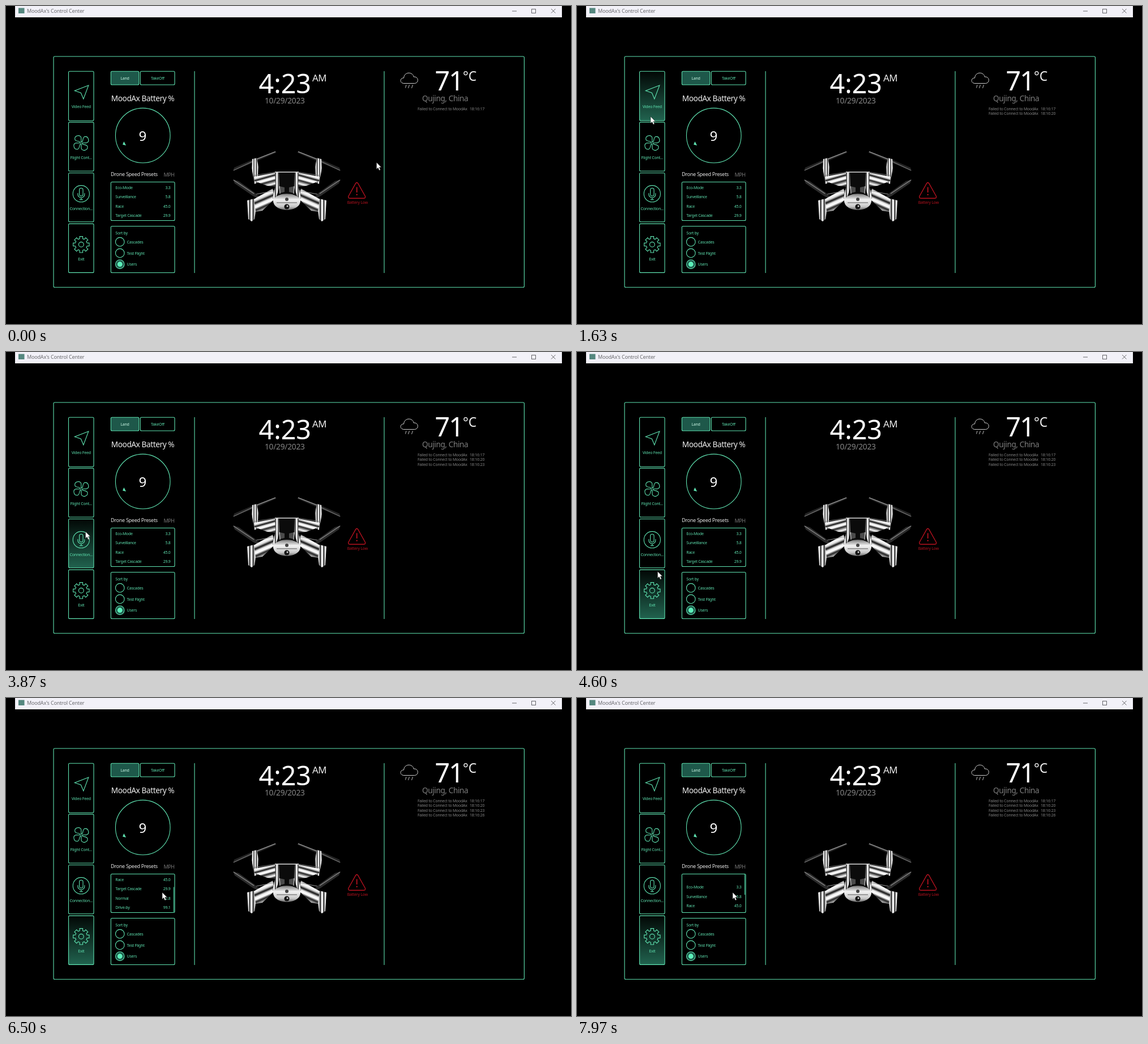
These frames come from a looping animation (998x561 px, 8 s). An HTML page with a canvas:

```html
<!DOCTYPE html>
<html lang="en">
<head>
<meta charset="utf-8">
<title>Control Center</title>
<style>
  html, body { margin: 0; width: 100%; height: 100%; overflow: hidden; background: #000; }
  canvas { display: block; width: 998px; height: 561px; }
</style>
</head>
<body>
<canvas id="stage" width="998" height="561"></canvas>
<script>
const ctx = document.getElementById('stage').getContext('2d');
const LOOP = 8000;
const MINT = '#5fe3b1', GREY = '#858585', RED = '#b5121f';
const BRAND = 'MoodAx';
const CARD_X = 110.5, CARD_W = 44.5, CARD_H = 87, CARD_Y = 115.3, CARD_STEP = 89.6;
const CARDS = ['Video Feed', 'Flight Cont...', 'Connection...', 'Exit'];
const PRESETS = [['Eco-Mode', '3.3'], ['Surveillance', '5.8'], ['Race', '45.0'],
  ['Target Cascade', '29.9'], ['Normal', '12.8'], ['Drive-by', '99.1']];
const ROW = 16.6;
// Log entries: time of appearance, printed clock
const LOG = [[0, '18:16:17'], [80, '18:16:20'], [2930, '18:16:23'], [5900, '18:16:26']];
// Pointer keys: time, x, y
const POINTER = [[300, 655, 276], [1150, 134, 172], [1630, 130.5, 195], [2400, 138, 232],
  [2970, 141.5, 245], [3870, 141, 317], [4700, 143, 390], [5500, 144, 409],
  [5620, 144, 409], [6050, 277, 343], [6500, 276.5, 343], [7970, 275.5, 343]];
const SCROLL = [[6100, 0], [6420, 2 * ROW], [7600, 2 * ROW], [7960, -13.4]];

function at(keys, t) {
  if (t <= keys[0][0]) return keys[0].slice(1);
  for (let i = 1; i < keys.length; i++) {
    const a = keys[i - 1], b = keys[i];
    if (t < b[0]) {
      const k = (t - a[0]) / (b[0] - a[0]), e = k * k * (3 - 2 * k);
      return a.slice(1).map((v, j) => v + (b[j + 1] - v) * e);
    }
  }
  return keys[keys.length - 1].slice(1);
}

function text(str, x, y, size, color, align = 'left', spacing = -0.03) {
  ctx.font = `${size}px "Noto Sans", "Open Sans", sans-serif`;
  ctx.letterSpacing = `${size * spacing}px`;
  ctx.textAlign = align;
  ctx.fillStyle = color;
  ctx.fillText(str, x, y);
}

function box(x, y, w, h, fill) {
  ctx.beginPath();
  ctx.roundRect(x, y, w, h, 2);
  if (fill) { ctx.fillStyle = fill; ctx.fill(); }
  line(MINT, 1.1);
}

function line(color, width) {
  ctx.strokeStyle = color;
  ctx.lineWidth = width;
  ctx.stroke();
}

function path(points, close) {
  ctx.beginPath();
  points.forEach(([x, y]) => ctx.lineTo(x, y));
  if (close) ctx.closePath();
}

function seg(x1, y1, x2, y2, color, width) {
  path([[x1, y1], [x2, y2]]);
  line(color, width);
}

function ring(x, y, r, color = MINT, width = 1.1) {
  ctx.beginPath();
  ctx.arc(x, y, r, 0, 7);
  line(color, width);
}

function dot(x, y, r, color) {
  ctx.beginPath();
  ctx.arc(x, y, r, 0, 7);
  ctx.fillStyle = color;
  ctx.fill();
}

function titleBar() {
  ctx.fillStyle = '#f2f1f8';
  ctx.fillRect(16, 0, 966, 20);
  ctx.fillStyle = '#55877f';
  ctx.fillRect(22, 3.5, 10.5, 9.5);
  text(`${BRAND}'s Control Center`, 37, 12, 9, '#6a6a6e', 'left', -0.02);
  seg(894, 9, 902, 9, '#66666a', 1);
  ctx.strokeRect(928.5, 5.5, 7, 7);
  seg(963, 5, 970.5, 12.5, '#66666a', 1);
  seg(970.5, 5, 963, 12.5, '#66666a', 1);
}

const ICONS = [
  () => {
    path([[13, -12], [-11.5, -2.5], [-0.5, 1.2], [4, 12]], true);
    line(MINT, 1.1);
  },
  () => {
    for (let i = 0; i < 4; i++) {
      ctx.beginPath();
      ctx.moveTo(-1, -1);
      ctx.bezierCurveTo(-3, -4, -9.5, -2, -11, -6);
      ctx.bezierCurveTo(-12.5, -13, -3, -15, -0.5, -10.5);
      ctx.bezierCurveTo(1, -7, -1.5, -4, 1, -1);
      line(MINT, 1.1);
      ctx.rotate(Math.PI / 2);
    }
  },
  () => {
    ring(0, 0, 14.6);
    ctx.beginPath();
    ctx.roundRect(-3.2, -10, 6.4, 14, 3.2);
    line(MINT, 1.1);
    ctx.beginPath();
    ctx.moveTo(-6, -1);
    ctx.lineTo(-6, 1);
    ctx.arc(0, 1, 6, Math.PI, 0, true);
    ctx.lineTo(6, -1);
    line(MINT, 1.1);
    seg(0, 7, 0, 10.5, MINT, 1.1);
    seg(-3, 10.5, 3, 10.5, MINT, 1.1);
  },
  () => {
    const points = [];
    for (let i = 0; i < 8; i++) {
      for (const [da, r] of [[-0.26, 10.6], [-0.19, 14.4], [0.19, 14.4], [0.26, 10.6]]) {
        const a = i * Math.PI / 4 + da;
        points.push([r * Math.cos(a), r * Math.sin(a)]);
      }
    }
    path(points, true);
    line(MINT, 1.1);
    ring(0, 0, 4.4);
  }
];

function cards(active) {
  CARDS.forEach((label, i) => {
    const y = CARD_Y + i * CARD_STEP;
    let fill = null;
    if (i === active) {
      fill = ctx.createLinearGradient(0, y, 0, y + CARD_H);
      fill.addColorStop(0, '#020705');
      fill.addColorStop(1, '#21634f');
    }
    box(CARD_X, y, CARD_W, i === 0 ? CARD_H : CARD_H - 0.7, fill);
    ctx.save();
    ctx.translate(132.8, y + 36.7);
    ICONS[i]();
    ctx.restore();
    text(label, 132.8, y + 65.1, 7, MINT, 'center');
  });
}

function presets(t) {
  const [scroll] = at(SCROLL, t);
  text('Drone Speed Presets', 185, 299.5, 9, '#e8e8e8');
  text('MPH', 297.5, 301, 9.1, '#777', 'right', -0.05);
  box(185.3, 310.5, 112.7, 68);
  ctx.save();
  ctx.beginPath();
  ctx.rect(186, 311, 111.5, 67);
  ctx.clip();
  PRESETS.forEach(([name, speed], i) => {
    const y = 322.5 + i * ROW - scroll;
    text(name, 193.3, y, 6.9, MINT);
    text(speed, 290.5, y, 6.9, MINT, 'right');
  });
  ctx.restore();
  if (t > 6100) {
    const over = Math.max(0, -scroll);
    ctx.globalAlpha = t > 7600 ? 1 : Math.max(0, Math.min(1, (7100 - t) / 300));
    ctx.fillStyle = '#379674';
    ctx.fillRect(295.6, 311 + Math.max(0, scroll) * 0.677, 2, 45.5 - over * 0.7);
    ctx.globalAlpha = 1;
  }
}

function controls() {
  box(185.3, 115.3, 49.5, 23.7, '#1e584a');
  box(237.3, 115.3, 60.7, 23.7);
  text('Land', 210, 130, 7, '#c9f5e4', 'center');
  text('TakeOff', 267.8, 130, 7, MINT, 'center');
  text(`${BRAND} Battery %`, 241.5, 168, 13.6, '#efefef', 'center');
  ring(241.7, 228.4, 48.3);
  text('9', 241.4, 238.4, 24, '#fff', 'center', 0);
  path([[208.3, 239], [206, 244.6], [212, 246]], true);
  ctx.fillStyle = MINT;
  ctx.fill();
}

function sorting() {
  box(185.3, 388.5, 112.7, 82);
  text('Sort by', 193.3, 403, 7, MINT);
  ['Cascades', 'Test Flight', 'Users'].forEach((label, i) => {
    const y = 416.2 + i * 19.7;
    if (i === 2) {
      dot(201.2, y, 7.6, '#1e584a');
      dot(201.2, y, 4.5, '#5cf0b9');
    }
    ring(201.2, y, 7.8);
    text(label, 213.5, y + 2.6, 7, MINT);
  });
}

function clock() {
  text('4:23', 446.5, 154, 46.6, '#fff', 'left', 0);
  text('AM', 541, 132.5, 16.8, '#eee');
  text('10/29/2023', 457, 172, 13.8, GREY, 'left', -0.02);
}

function weather(t) {
  ctx.beginPath();
  ctx.moveTo(703, 136.5);
  ctx.bezierCurveTo(695, 136.5, 695.5, 126.5, 702.5, 127);
  ctx.bezierCurveTo(703.5, 115, 719, 116, 720, 125);
  ctx.bezierCurveTo(729.5, 124, 729.5, 136.5, 721.5, 136.5);
  ctx.closePath();
  line('#d0d0d0', 1);
  [[707, 142], [712.5, 145], [718.5, 145]].forEach(([x, y], i) =>
    seg(x, 139, x - (i ? 2 : 1.5), y + (i ? 0 : 2.5), '#bbb', 1));
  text('71', 757.5, 149, 46.6, '#fff', 'left', -0.04);
  text('°C', 807, 131.8, 23, '#eee', 'left', 0);
  text('Qujing, China', 735, 168, 13.6, '#7d7d7d');
  LOG.forEach(([start, stamp], i) => {
    if (t < start) return;
    const y = 184 + i * 8.3;
    text(`Failed to Connect to ${BRAND}`, 727, y, 6.9, '#838383');
    text(stamp, 819, y, 6.9, '#838383', 'left', -0.02);
  });
}

function warning() {
  ctx.lineJoin = 'round';
  path([[617.8, 312.6], [619.7, 311.3], [621.6, 312.6], [634.7, 336], [634.2, 338.6],
    [632, 339.3], [607.4, 339.3], [605.2, 338.6], [604.7, 336]], true);
  line(RED, 1.4);
  seg(619.7, 319.5, 619.7, 329, RED, 1.8);
  dot(619.7, 332.8, 1.2, RED);
  ctx.lineJoin = 'miter';
  text('Battery Low', 620.8, 349, 6.9, RED, 'center');
}

// Polished surface: alternating bright and dark bands along a direction
function chrome(points, x1, y1, x2, y2) {
  const tones = ['#555', '#fff', '#ddd', '#111', '#eee', '#fff', '#222', '#999', '#fff', '#333'];
  const grad = ctx.createLinearGradient(x1, y1, x2, y2);
  tones.forEach((tone, i) => grad.addColorStop(i / (tones.length - 1), tone));
  path(points, true);
  ctx.fillStyle = grad;
  ctx.fill();
}

function droneHalf() {
  // rear rotor, post and arm
  path([[-95, 291], [-93, 285], [-58, 270], [-20, 256], [-19, 259], [-54, 274]], true);
  ctx.fillStyle = '#242424';
  ctx.fill();
  seg(-94, 290, -60, 274, '#777', 1.2);
  seg(-55, 271, -20, 257, '#aaa', 1.3);
  chrome([[-61, 270], [-53, 268], [-50, 284], [-52, 312], [-57, 314], [-62, 286]], -62, 0, -50, 0);
  chrome([[-58, 301], [-20, 294], [-20, 319], [-35, 317], [-57, 309]], -45, 296, -38, 321);
  seg(-58, 299, -20, 293, '#777', 1);
  // front rotor, arm and foot
  path([[-95, 306], [-85, 309], [-57, 329], [-40, 345], [-60, 335], [-92, 313]], true);
  ctx.fillStyle = '#2c2c2c';
  ctx.fill();
  seg(-94, 307, -58, 331, '#8c8c8c', 1.2);
  chrome([[-69, 347], [-55, 339], [-25, 322], [-21, 340], [-43, 361], [-66, 365]], -56, 335, -42, 367);
  chrome([[-70, 343], [-58, 340], [-55, 362], [-57, 376], [-62, 380], [-68, 376]], -71, 0, -54, 0);
  seg(-54, 332, -22, 326, '#999', 1);
  // hull flank
  chrome([[-21, 293], [-14, 293], [-13, 320], [-17, 332], [-22, 348], [-25, 338], [-20, 317]], -25, 0, -10, 0);
  path([[-13, 318], [-4, 320], [-4, 328], [-12, 330]], true);
  ctx.fillStyle = '#4b4b4b';
  ctx.fill();
  seg(-13, 318, -12, 331, '#ccc', 1.2);
}

function drone() {
  ctx.save();
  ctx.translate(496, 0);
  path([[-20, 293], [20, 293], [24, 340], [-24, 340]], true);
  ctx.fillStyle = '#0b0b0b';
  ctx.fill();
  droneHalf();
  ctx.save();
  ctx.scale(-1, 1);
  droneHalf();
  ctx.restore();
  seg(-21, 293, 21, 293, '#ddd', 1.5);
  ctx.beginPath();
  ctx.moveTo(-24, 341);
  ctx.bezierCurveTo(-14, 328, 14, 328, 24, 341);
  ctx.bezierCurveTo(27, 366, -27, 366, -24, 341);
  const nose = ctx.createLinearGradient(0, 331, 0, 361);
  nose.addColorStop(0, '#777');
  nose.addColorStop(0.35, '#f2f2f2');
  nose.addColorStop(0.75, '#c9c9c9');
  nose.addColorStop(1, '#555');
  ctx.fillStyle = nose;
  ctx.fill();
  seg(-18, 347, 18, 347, '#555', 1);
  dot(0, 341, 3, '#444');
  dot(0, 354, 4.6, '#141414');
  dot(1, 353, 1.5, '#ddd');
  ctx.restore();
}

function pointer(x, y) {
  path([[0, 0], [0, 11.8], [2.7, 9.3], [4.7, 14], [6.8, 13], [4.9, 8.6], [8.4, 8.4]]
    .map(([dx, dy]) => [x + dx - 0.5, y + dy]), true);
  ctx.fillStyle = '#fff';
  ctx.fill();
  line('#222', 0.5);
}

function activeCard(t, y) {
  if (t < 1060) return -1;
  if (t > 5500) return 3;
  return Math.max(0, Math.min(3, Math.floor((y - 114.5) / CARD_STEP)));
}

function draw(t) {
  ctx.fillStyle = '#000';
  ctx.fillRect(0, 0, 998, 561);
  const [x, y] = at(POINTER, t);
  titleBar();
  box(84, 89, 831.4, 407.3);
  seg(333, 115, 333, 471, MINT, 1.1);
  seg(668, 115, 668, 471, MINT, 1.1);
  cards(activeCard(t, y));
  controls();
  presets(t);
  sorting();
  clock();
  weather(t);
  drone();
  warning();
  pointer(x, y);
}

const begin = performance.now();
function tick() {
  draw((performance.now() - begin) % LOOP);
  requestAnimationFrame(tick);
}
tick();
</script>
</body>
</html>
```
